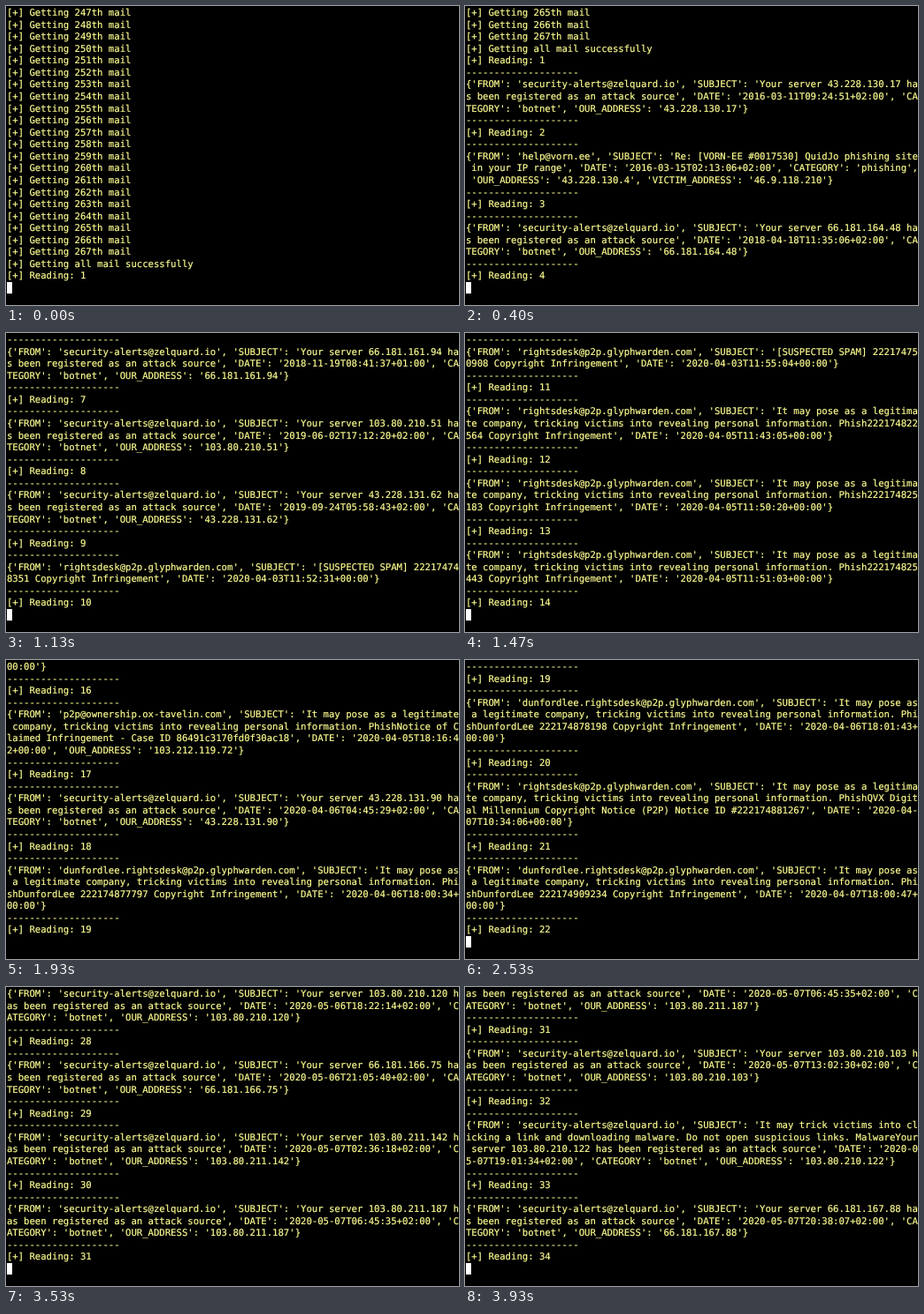
These frames come from a looping animation (512 by 339 pixels, 3.99 s). An HTML page:

```html
<!DOCTYPE html>
<html lang="en">
<head>
<meta charset="utf-8">
<title>Mail reader log</title>
<style>
  html, body {
    margin: 0;
    width: 100%;
    height: 100%;
    overflow: hidden;
    background: #000;
  }
  #screen {
    position: absolute;
    left: 0.9px;
    top: 1.1px;
    margin: 0;
    color: #fcfc90;
    font: 10.61px/13.56px "DejaVu Sans Mono", monospace;
    font-variant-ligatures: none;
    text-rendering: geometricPrecision;
    -webkit-text-stroke: 0.2px #fcfc90;
    white-space: pre;
  }
  #cursor {
    position: absolute;
    left: 1px;
    top: 313px;
    width: 6px;
    height: 13px;
    background: #fff;
    filter: blur(0.4px);
  }
</style>
</head>
<body>
<pre id="screen"></pre>
<div id="cursor"></div>
<script>
const LOOP = 3990, TICK = 200 / 3, BLINK_TICKS = 9;
const COLS = 80, ROWS = 23;
const RULE = '-'.repeat(20);

const GUARD = 'security-alerts@zelquard.io';
const RIGHTS = 'rightsdesk@p2p.glyphwarden.com';
const BOOKS = 'dunfordlee.' + RIGHTS;
const PHISH = 'It may pose as a legitimate company, tricking victims into revealing personal information. Phish';
const MALWARE = 'It may trick victims into clicking a link and downloading malware. Do not open suspicious links. Malware';

const record = fields =>
  '{' + Object.entries(fields).map(([key, value]) => `'${key}': '${value}'`).join(', ') + '}';

const mail = (FROM, SUBJECT, DATE, more = {}) => record({ FROM, SUBJECT, DATE, ...more });

const botnet = (ip, date, zone = '+02:00', prefix = '') =>
  mail(GUARD, `${prefix}Your server ${ip} has been registered as an attack source`, date + zone,
    { CATEGORY: 'botnet', OUR_ADDRESS: ip });

const claim = (from, subject, date) =>
  mail(from, subject + ' Copyright Infringement', date + '+00:00');
const rights = (id, date) => claim(RIGHTS, PHISH + id, date);
const books = (id, date) => claim(BOOKS, PHISH + 'DunfordLee ' + id, date);

const mails = [
  botnet('43.228.130.17', '2016-03-11T09:24:51'),
  mail('help@vorn.ee', 'Re: [VORN-EE #0017530] QuidJo phishing site in your IP range',
    '2016-03-15T02:13:06+02:00',
    { CATEGORY: 'phishing', OUR_ADDRESS: '43.228.130.4', VICTIM_ADDRESS: '46.9.118.210' }),
  botnet('66.181.164.48', '2018-04-18T11:35:06'),
  mail('traffic-watch@nurbolt.com',
    'Abuse Message [AbuseID:5491D1:1B]: NetscanInLevel: Netscan detected from 139.5.216.183',
    '2018-11-07T09:33:05+01:00', { CATEGORY: 'scan', OUR_ADDRESS: '139.5.216.183' }),
  botnet('66.181.165.212', '2018-11-11T13:20:09', '+01:00'),
  botnet('66.181.161.94', '2018-11-19T08:41:37', '+01:00'),
  botnet('103.80.210.51', '2019-06-02T17:12:20'),
  botnet('43.228.131.62', '2019-09-24T05:58:43'),
  claim(RIGHTS, '[SUSPECTED SPAM] 222174748351', '2020-04-03T11:52:31'),
  claim(RIGHTS, '[SUSPECTED SPAM] 222174750908', '2020-04-03T11:55:04'),
  rights('222174822564', '2020-04-05T11:43:05'),
  rights('222174825183', '2020-04-05T11:50:20'),
  rights('222174825443', '2020-04-05T11:51:03'),
  rights('222174826017', '2020-04-05T11:53:48'),
  books('222174838126', '2020-04-05T18:00:39'),
  mail('p2p@ownership.ox-tavelin.com',
    PHISH + 'Notice of Claimed Infringement - Case ID 86491c3170fd0f30ac18',
    '2020-04-05T18:16:42+00:00', { OUR_ADDRESS: '103.212.119.72' }),
  botnet('43.228.131.90', '2020-04-06T04:45:29'),
  books('222174877797', '2020-04-06T18:00:34'),
  books('222174878198', '2020-04-06T18:01:43'),
  mail(RIGHTS, PHISH + 'QVX Digital Millennium Copyright Notice (P2P) Notice ID #222174881267',
    '2020-04-07T10:34:06+00:00'),
  books('222174909234', '2020-04-07T18:00:47'),
  botnet('103.80.210.108', '2020-05-06T04:17:52'),
  botnet('192.82.65.200', '2020-05-06T06:30:05'),
  botnet('103.80.210.113', '2020-05-06T08:28:27'),
  botnet('103.80.210.116', '2020-05-06T12:11:59'),
  botnet('66.181.160.113', '2020-05-06T15:49:09'),
  botnet('103.80.210.120', '2020-05-06T18:22:14'),
  botnet('66.181.166.75', '2020-05-06T21:05:40'),
  botnet('103.80.211.142', '2020-05-07T02:36:18'),
  botnet('103.80.211.187', '2020-05-07T06:45:35'),
  botnet('103.80.210.103', '2020-05-07T13:02:30'),
  botnet('103.80.210.122', '2020-05-07T19:01:34', '+02:00', MALWARE),
  botnet('66.181.167.88', '2020-05-07T20:38:07')
];

// Build the whole log; ends[n] is its length once mail n is announced.
const log = [], ends = [];
const wrap = text => text.match(new RegExp(`.{1,${COLS}}`, 'g'));
const announce = n => { ends[n] = log.push(`[+] Reading: ${n}`); };

for (let n = 247; n <= 267; n++) log.push(`[+] Getting ${n}th mail`);
log.push('[+] Getting all mail successfully');
announce(1);
mails.forEach((text, i) => {
  log.push(RULE, ...wrap(text), RULE);
  announce(i + 2);
});

// Reading pace: [tick, mail number], linear in between.
const pace = [[0, 1], [12, 6], [22, 14], [29, 19], [38, 22], [46, 27], [59, 34]];

function mailAt(tick) {
  const next = Math.max(1, pace.findIndex(([t]) => t >= tick));
  const [t0, n0] = pace[next - 1], [t1, n1] = pace[next];
  return Math.round(n0 + (n1 - n0) * (tick - t0) / (t1 - t0));
}

const screenEl = document.getElementById('screen');
const cursorEl = document.getElementById('cursor');
let shown = 0;

function draw() {
  const tick = Math.min(59, Math.floor((performance.now() % LOOP + 4) / TICK));
  const n = mailAt(tick);
  if (n !== shown) {
    screenEl.textContent = log.slice(ends[n] - ROWS, ends[n]).join('\n');
    shown = n;
  }
  const lit = Math.floor((tick + 2) / BLINK_TICKS) % 2 === 0;
  cursorEl.style.visibility = lit ? 'visible' : 'hidden';
  requestAnimationFrame(draw);
}
draw();
</script>
</body>
</html>
```
